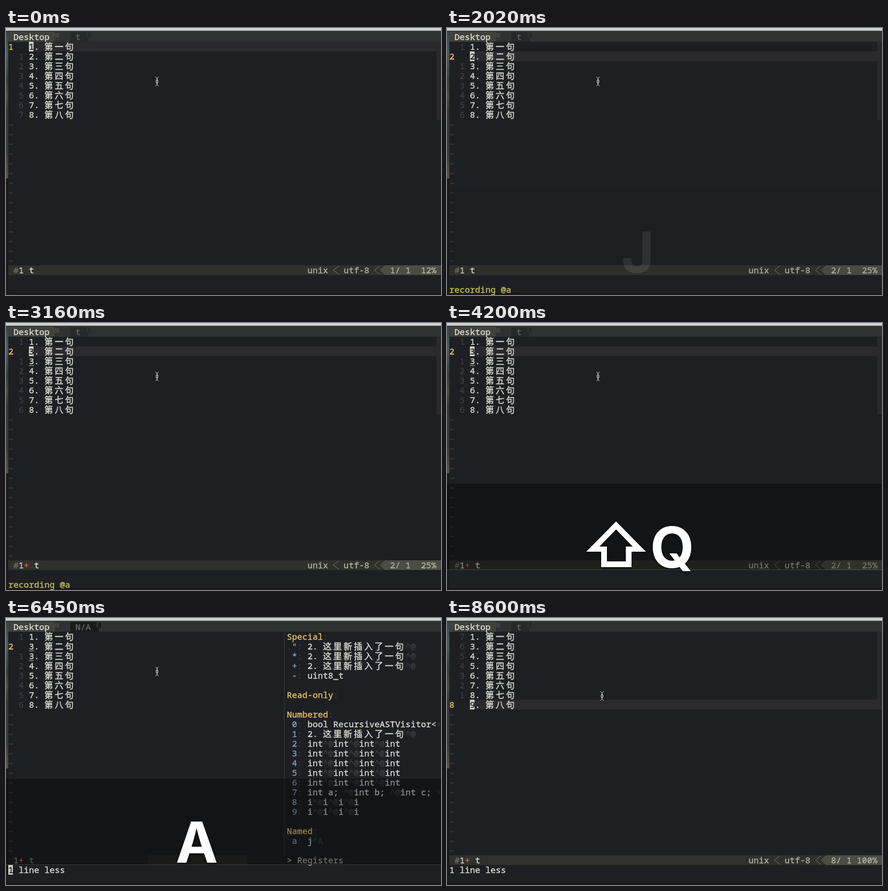
Write an HTML page that moves like this. It is 759 by 467 pixels and loops after 8.65 s.

```html
<!DOCTYPE html>
<html lang="zh">
<head>
<meta charset="utf-8">
<title>Macro replay</title>
<style>
html, body { margin: 0; width: 100%; height: 100%; overflow: hidden; background: #1e1f22; }
svg { display: block; width: 759px; height: 467px; }
text { font: 500 15px "Noto Sans Mono", "DejaVu Sans Mono", monospace; white-space: pre; stroke-width: .35px; }
.cjk { font-family: "Noto Sans CJK SC", "Noto Sans CJK JP", "Noto Sans CJK", sans-serif; letter-spacing: 3px; }
.key { font: 700 99px Inter, "Liberation Sans", sans-serif; }
.keys { filter: drop-shadow(0 2px 2px rgba(0,0,0,.5)); }
</style>
</head>
<body>
<svg id="stage" viewBox="0 0 759 467" xmlns="http://www.w3.org/2000/svg"></svg>
<script>
const LOOP = 8650, CELL = 9, LINE = 17, TOP = 7;
const C = {
  bg: '#1e1f22', line: '#2a2a2d', bar: '#30312c', tab: '#303131', tabOn: '#40413c',
  fg: '#deded6', dim: '#3d3e41', soft: '#b2b2a5', yellow: '#e9c46a', blue: '#86a3b8',
  red: '#e4604f', block: '#d0d0c9', lime: '#c3c55c'
};

// [time, changes]: each step keeps what the steps before it set
const steps = [
  [0, { row: 1, nums: '12345678', key: '', a: 0, msg: '', mod: 0, hl: 0, reg: 0, cur: 1, px: 263, py: 93 }],
  ...fadeIn(420, 490, 560, { key: '⇧Q' }),
  [770, { key: 'A', msg: 'recording @a' }],
  ...fadeOut(1280, 1350, 1420),
  ...fadeIn(2020, 2110, 2200, { key: 'J', row: 2 }),
  [2440, { key: '⌃A' }],
  [2500, { nums: '13345678', mod: 1 }],
  [2560, { hl: 1 }],
  ...fadeOut(3040, 3100, 3160),
  ...fadeIn(4060, 4130, 4200, { key: '⇧Q', msg: '' }),
  ...fadeOut(4620, 4680, 4740),
  [5160, { cur: 0 }],
  [5220, { cur: 1 }],
  ...fadeIn(5510, 5570, 5640, { key: '6' }),
  [5780, { key: '⇧2' }],
  [5910, { reg: 1 }],
  [5970, { reg: 2 }],
  [6040, { reg: 3, msg: '1 line less' }],
  [6450, { key: 'A' }],
  [6540, { reg: 0, row: 8, nums: '13456789', hl: 0 }],
  ...fadeOut(6900, 6970, 7040),
  [8540, { px: 267, py: 116 }],
  [8600, { px: 270, py: 136 }]
];

function fadeIn(t1, t2, t3, first) {
  return [[t1, { ...first, a: .08 }], [t2, { a: .55 }], [t3, { a: 1 }]];
}
function fadeOut(t1, t2, t3) {
  return [[t1, { a: .6 }], [t2, { a: .25 }], [t3, { a: 0 }]];
}

const states = [];
for (const [t, change] of steps) states.push({ ...states.at(-1), ...change, t });

const esc = s => s.replace(/&/g, '&amp;').replace(/</g, '&lt;');
const paint = c => `fill="${c}" stroke="${c}"`;
const rect = (x, y, w, h, fill) => `<rect x="${x}" y="${y}" width="${w}" height="${h}" fill="${fill}"/>`;
const path = (d, attrs) => `<path d="${d}" ${attrs}/>`;
const rowY = r => TOP + r * LINE;

// Han characters take two cells; control codes such as ^@ are dimmed
function text(x, row, str, color = C.fg) {
  const body = str.split(/([\u4e00-\u9fff]+|\^[@A])/).map((part, i) =>
    i % 2 === 0 ? esc(part)
      : part[0] === '^' ? `<tspan ${paint(C.dim)}>${part}</tspan>`
      : `<tspan class="cjk">${part}</tspan>`).join('');
  return `<text x="${x}" y="${rowY(row) + 14}" ${paint(color)}>${body}</text>`;
}

function block(x, row, ch) {
  return rect(x, rowY(row), CELL - 1, LINE, C.block) + text(x, row, ch, '#1b1c1e');
}

function frame() {
  return `<defs>
    <linearGradient id="side" x2="0" y2="1">
      <stop offset="0" stop-color="#3c4346"/><stop offset=".15" stop-color="#4d5a60"/>
      <stop offset=".33" stop-color="#363c40"/><stop offset=".44" stop-color="#484b40"/>
      <stop offset=".55" stop-color="#33363a"/><stop offset=".82" stop-color="#383a3c"/>
      <stop offset="1" stop-color="#5b5148"/>
    </linearGradient></defs>`
    + rect(0, 0, 759, 467, C.bg) + rect(0, 0, 759, 4, '#d0d2cf')
    + rect(0, 4, 759, 1, '#a4a6a4') + rect(0, 5, 759, 2, '#343738')
    + rect(0, 7, 4, 256, 'url(#side)') + rect(0, 263, 4, 204, '#1c1a1b')
    + rect(0, 463, 759, 4, '#1c181b');
}

function tabs(s) {
  const name = s.reg ? 'N/A' : 't', end = s.reg ? 158 : 140;
  const bg = s.reg ? '#1a1b1b' : '#272829';
  return rect(4, TOP, 755, LINE, C.tab) + rect(4, TOP, 81, LINE, C.tabOn)
    + rect(85, TOP + 2, 8, 8, C.tabOn) + rect(112, TOP, end - 112, LINE, bg)
    + rect(end, TOP + 9, 4, 8, bg) + rect(end + 3, TOP + 1, 5, 9, bg)
    + text(13, 0, 'Desktop') + text(121, 0, name, '#66675f');
}

function buffer(s) {
  let out = '';
  if (!s.reg) {
    out += rect(751, 24, 8, 136, '#29292d');
    out += rect(40, rowY(s.row), 719, LINE, C.line);
  }
  [...'一二三四五六七八'].forEach((han, i) => {
    const r = i + 1, gap = Math.abs(r - s.row);
    out += gap ? text(22, r, String(gap), C.dim) : text(4, r, String(r), C.yellow);
    out += text(40, r, `${s.nums[i]}. 第${han}句`);
    if (s.hl && (r === 2 || r === 3)) out += rect(40, rowY(r) + 16, CELL, 1, '#a9a9a2');
  });
  if (s.cur && s.reg < 3) out += block(40, s.row, s.nums[s.row - 1]);
  for (let r = 9; r < 24; r++) out += text(4, r + .06, '~', C.dim);
  return out;
}

function status(s) {
  const flag = x => s.mod ? text(x, 24, '+', C.red) : '';
  if (s.reg) {
    return (s.key === 'A' ? rect(248, 415, 173, 16, '#292a27') : '')
      + text(13, 24, '1', '#8d8d7c') + flag(22) + text(40, 24, 't', '#77776c')
      + text(490, 24, '> Registers', '#a8a89e');
  }
  const pos = `${s.row}/ 1`, pct = Math.floor(s.row * 12.5) + '%';
  const thin = 'fill="none" stroke="#74756a" stroke-width="1"';
  return rect(4, 415, 755, LINE, C.bar)
    + path('M661 415L652 423.5L661 432H759V415Z', 'fill="#4b4c43"')
    + path('M581 416L571 423.5L581 431M652 416L643 423.5L652 431', thin)
    + text(13, 24, '#', '#6c6d63') + text(22, 24, '1', '#cfcfc2') + flag(31)
    + text(s.mod ? 49 : 40, 24, 't')
    + text(526, 24, 'unix', C.soft) + text(589, 24, 'utf-8', C.soft)
    + text(670, 24, pos, C.soft) + text(751 - pct.length * CELL, 24, pct, C.soft);
}

function registers(s) {
  let out = rect(485, 24, 1, 391, '#3a3b3e');
  if (s.reg < 2) return out;
  const heads = { 1: 'Special', 7: 'Read-only', 9: 'Numbered', 21: 'Named' };
  for (const r in heads) {
    out += text(490, +r, heads[r], C.yellow) + text(490 + heads[r].length * CELL, +r, ':', C.dim);
  }
  const item = (r, name, val) => {
    out += text(499, r, name, C.blue) + text(508, r, ':', C.dim) + text(526, r, val);
  };
  const added = '2. 这里新插入了一句^@';
  [...'"*+'].forEach((n, i) => item(2 + i, n, added));
  item(5, '-', 'uint8_t');
  item(10, '0', 'bool RecursiveASTVisitor<');
  item(11, '1', added);
  for (let n = 2; n < 7; n++) item(10 + n, String(n), 'int^@int^@int^@int');
  item(17, '7', 'int a; ^@int b; ^@int c; ');
  for (const n of [8, 9]) item(10 + n, String(n), 'i^@i^@i^@i');
  item(22, 'a', 'j^A');
  return out + text(751, 10, '›', C.dim) + text(751, 17, '›', C.dim);
}

function message(s) {
  if (!s.msg) return '';
  if (s.msg[0] === 'r') return text(4, 26, s.msg, C.lime);
  return text(4, 25, s.msg) + (s.reg === 3 ? block(4, 25, '1') : '');
}

function keycast(s) {
  if (!s.a) return '';
  const ch = s.key.at(-1), mark = s.key.length > 1 ? s.key[0] : '';
  const x = !mark ? 333 : mark === '⌃' ? 378 : ch === 'Q' ? 393 : 388;
  const shift = ch === 'Q' ? 0 : 4;
  let sign = '';
  if (mark === '⇧') {
    sign = path('M295 347L347 400H322V427H269V400H243ZM295 361L266 391H279V417H312V391H324Z',
      `fill="#fff" fill-rule="evenodd" transform="translate(${shift} 0)"`);
  } else if (mark) {
    sign = path('M261 391L295 359L329 391', 'fill="none" stroke="#fff" stroke-width="11"');
  }
  return `<g opacity="${s.a}">` + rect(0, 281, 759, 151, 'rgba(0,0,0,.36)') + rect(0, 431, 759, 1, 'rgba(255,255,255,.16)')
    + `<g class="keys">${sign}<text class="key" x="${x}" y="428" text-anchor="middle" fill="#fff">${ch}</text></g></g>`;
}

function pointer(s) {
  const d = 'M-3 -8Q0 -7 0 -4V4Q0 7 -3 8M3 -8Q0 -7 0 -4M0 4Q0 7 3 8M0 -4Q-4 0 0 4Q4 0 0 -4';
  return `<g transform="translate(${s.px + .5} ${s.py + .5})" fill="none">`
    + path(d, 'stroke="#0c0c0d" stroke-width="2.2"') + path(d, 'stroke="#dedede" stroke-width="1"') + '</g>';
}

const stage = document.getElementById('stage');
function draw(s) {
  stage.innerHTML = frame() + tabs(s) + buffer(s) + (s.reg ? registers(s) : '')
    + status(s) + message(s) + keycast(s) + pointer(s);
}

const start = performance.now();
let shown = null;
function tick() {
  const t = (performance.now() - start) % LOOP;
  const s = states.findLast(st => st.t <= t);
  if (s !== shown) draw(shown = s);
  requestAnimationFrame(tick);
}
tick();
</script>
</body>
</html>
```
